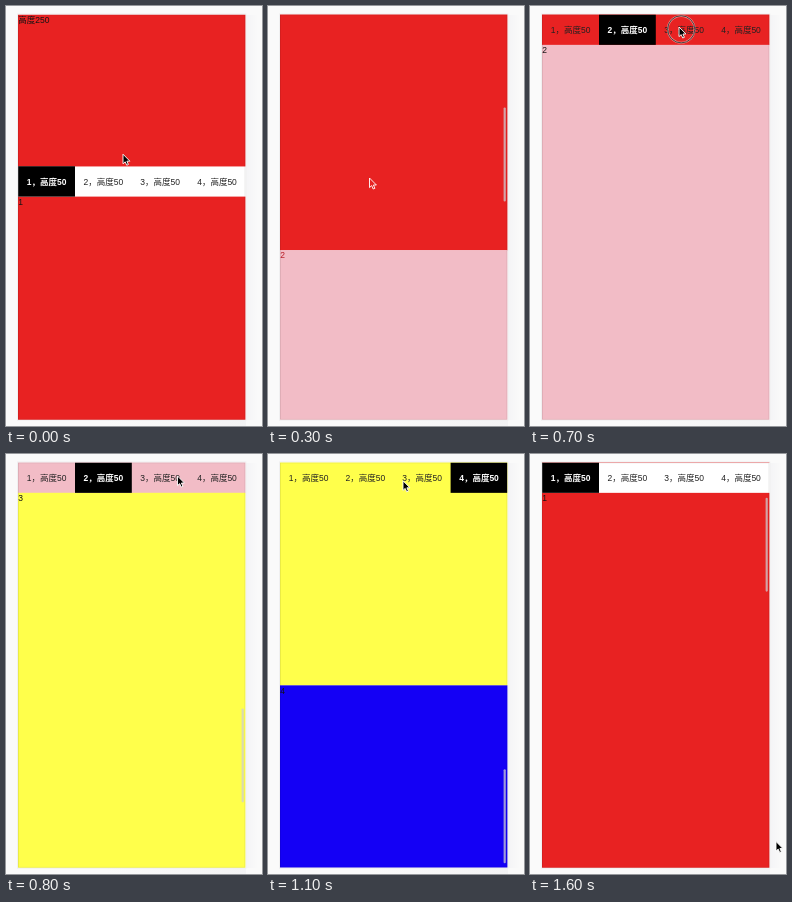
Animation, 256 px wide and 420 px high, one loop 1.7 s. Source, as an HTML page:

```html
<!DOCTYPE html>
<html lang="zh">
<head>
<meta charset="utf-8">
<title>Sticky tabs</title>
<style>
  html, body { margin: 0; width: 100%; height: 100%; overflow: hidden; background: #fafafa; }
  svg { display: block; width: 256px; height: 420px; }
  text { font: 8.5px "Liberation Sans", "Noto Sans CJK SC", "Noto Sans CJK", sans-serif; }
  text.on { font-weight: 700; }
</style>
</head>
<body>
<svg id="stage" viewBox="0 0 256 420">
  <defs>
    <clipPath id="view"><rect x="12" y="8.5" width="227.4" height="405.2"/></clipPath>
    <linearGradient id="edge">
      <stop offset="0" stop-color="#f4f4f6"/>
      <stop offset="1" stop-color="#fafafa"/>
    </linearGradient>
    <linearGradient id="foot">
      <stop offset="0" stop-color="#fafafa"/>
      <stop offset="1" stop-color="#f3f3f4"/>
    </linearGradient>
  </defs>
  <rect width="256" height="420" fill="#fafafa"/>
  <rect x="240" y="9" width="12" height="405" fill="url(#edge)"/>
  <rect x="100" y="414" width="140" height="6" fill="url(#foot)"/>
  <rect x="11.5" y="8" width="228.4" height="406.2" fill="#fff" stroke="#f0f0f1"/>
  <g clip-path="url(#view)">
    <g id="page"></g>
    <g id="bar"></g>
    <rect id="thumb" x="235.6" width="2.2" height="94" rx="1.1" fill="#cdcdd2" fill-opacity=".75"/>
    <rect x="12.4" y="8.9" width="226.6" height="404.4" fill="none" stroke="#000" stroke-opacity=".1" stroke-width=".8"/>
  </g>
  <g id="cursor">
    <g id="ring" fill="none">
      <circle cx="2.2" cy="2.3" r="13.4" stroke="#fff" stroke-opacity=".45" stroke-width="2"/>
      <circle cx="2.2" cy="2.3" r="13.6" stroke="#444" stroke-width="1"/>
    </g>
    <path id="arrow" d="M0 0V9.6L2.2 7.6L3.7 11L5.4 10.3L3.9 7H6.9Z" stroke="#fff" stroke-width=".9" stroke-linejoin="round"/>
  </g>
</svg>
<script>
const LOOP = 1700, STEP = 100;
const U = 0.607;                      // page pixel to stage pixel
const TOP = 8.5, LEFT = 12.2, WIDTH = 227.2;
const HEAD = 250 * U, BAR = 50 * U, CELL = WIDTH / 4;
const $ = id => document.getElementById(id);

// Keys are [step, ...values], linear in between.
const SCROLL = [[0, 0], [3, 401.7], [4, 430], [5, 607], [7, 607], [8, 1062.3],
  [9, 1062.3], [10, 1325], [12, 1325], [14, 1238], [15, 1224], [16, HEAD]];
const POINTER = [[0, 117, 148.2], [3, 101.5, 172], [4, 97, 16], [5, 108, 18], [7, 149, 21],
  [8, 171.5, 22], [9, 200, 22], [11, 135, 26.8], [14, 54.8, 22], [15, 42, 18], [16, 246, 387.5]];
const ACTIVE = [[0, 0], [5, 1], [9, 2], [10, 3], [16, 0]];
const CLICKS = [4, 7, 9, 15];

function add(parent, tag, attrs, text) {
  const el = document.createElementNS('http://www.w3.org/2000/svg', tag);
  for (const k in attrs) el.setAttribute(k, attrs[k]);
  if (text) el.textContent = text;
  return parent.appendChild(el);
}

function at(keys, n) {
  const i = keys.findIndex(k => k[0] > n);
  if (i < 0) return keys[keys.length - 1].slice(1);
  if (i === 0) return keys[0].slice(1);
  const a = keys[i - 1], b = keys[i], p = (n - a[0]) / (b[0] - a[0]);
  return a.slice(1).map((v, j) => v + (b[j + 1] - v) * p);
}

const scrollAt = n => at(SCROLL, Math.max(0, n))[0];

const labels = [];
function block(y, height, fill, label) {
  add($('page'), 'rect', { x: 11, y, width: 230, height: height + 0.2, fill });
  labels.push(add($('page'), 'text', { x: LEFT, y: y + 8.2 }, label));
}

block(TOP, HEAD, '#e82222', '高度250');
[['#e82222', 750], ['#f2bcc6', 750], ['#ffff4b', 750], ['#1400f5', 300]].forEach(([fill, h], i) =>
  block(TOP + HEAD + BAR + i * 750 * U, h * U, fill, String(i + 1)));

const tabs = [0, 1, 2, 3].map(i => {
  const x = LEFT + i * CELL;
  return {
    back: add($('bar'), 'rect', { x, y: 0, width: CELL, height: BAR }),
    text: add($('bar'), 'text', { x: x + CELL / 2, y: 18.4, 'text-anchor': 'middle' }, `${i + 1}，高度50`)
  };
});

function draw(ms) {
  const n = Math.floor((ms % LOOP) / STEP);
  const scroll = scrollAt(n);
  const flowY = TOP + HEAD - scroll;
  // The bar only sticks once the first swipe has settled.
  const barY = n < 4 ? flowY : Math.max(TOP, flowY);
  const hidden = barY < TOP - BAR;
  const active = ACTIVE.filter(k => k[0] <= n).pop()[1];
  const [x, y] = at(POINTER, n);

  $('page').setAttribute('transform', `translate(0 ${-scroll})`);
  $('bar').setAttribute('transform', `translate(0 ${barY})`);
  labels.forEach(l => l.setAttribute('fill', hidden ? '#b81c26' : '#141414'));
  tabs.forEach((tab, i) => {
    const on = i === active;
    tab.back.setAttribute('fill', on ? '#000' : 'none');
    tab.text.setAttribute('fill', on ? '#fff' : '#222');
    tab.text.setAttribute('class', on ? 'on' : '');
  });

  const moved = scroll !== scrollAt(n - 1) || scroll !== scrollAt(n - 2);
  $('thumb').setAttribute('visibility', moved ? 'visible' : 'hidden');
  $('thumb').setAttribute('y', TOP + scroll * 0.2315);

  $('cursor').setAttribute('transform', `translate(${x} ${y})`);
  $('ring').setAttribute('visibility', CLICKS.includes(n) ? 'visible' : 'hidden');
  $('arrow').setAttribute('fill', hidden ? '#e82222' : '#000');
}

const start = performance.now();
function tick() {
  draw(performance.now() - start);
  requestAnimationFrame(tick);
}
draw(0);
requestAnimationFrame(tick);
</script>
</body>
</html>
```
